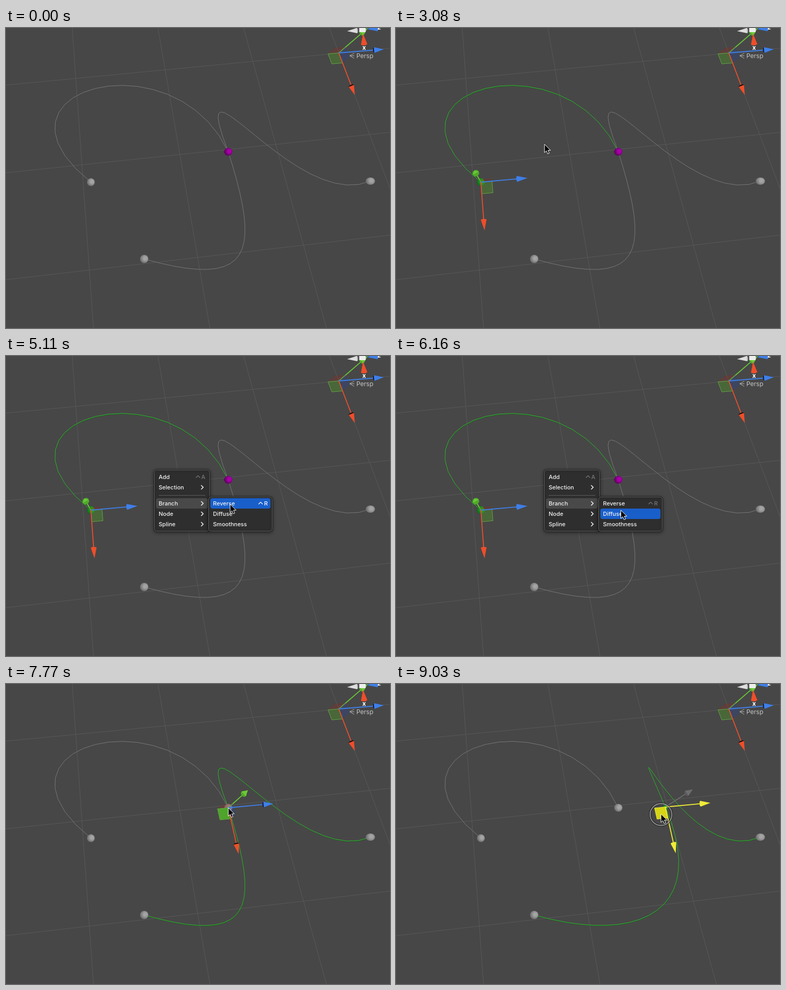
These frames come from a looping animation (742 px wide and 578 px high, 9100 ms). An HTML page with a canvas:

```html
<!DOCTYPE html>
<html lang="en">
<head>
<meta charset="utf-8">
<title>Spline editor</title>
<style>
  html, body { margin: 0; width: 100%; height: 100%; overflow: hidden; background: #474747; }
  canvas { display: block; }
</style>
</head>
<body>
<canvas id="stage" width="742" height="578"></canvas>
<script>
const ctx = document.getElementById('stage').getContext('2d');
const LOOP = 9100, STEP = 70;
const RED = '#ee4e2a', BLUE = '#3f7fe8', GREEN = '#6cc936', YELLOW = '#f0ec38', DIM = '#6d6d6d';

const vec = (x, y) => ({ x, y });
const add = (a, b, k = 1) => vec(a.x + b.x * k, a.y + b.y * k);
const mix = (a, b, k) => vec(a.x + (b.x - a.x) * k, a.y + (b.y - a.y) * k);
const progress = (t, from, to) => Math.min(1, Math.max(0, (t - from) / (to - from)));
const ease = k => k * k * (3 - 2 * k);

// Scene points
const start = vec(164, 297), joint = vec(429.5, 238.5), tail = vec(267, 445), end = vec(704, 295);
const root = vec(643, 48), menu = vec(285.5, 218.5), submenu = vec(390.5, 270.5);
const dragBy = vec(91, -1.5);
const handle = add(joint, vec(-8.5, 13.5));

// The pointer rests at each place until the next move begins
const entry = vec(264, 478);
const moves = [
  { from: 140, to: 350, place: vec(253, 231) },
  { from: 630, to: 1680, place: start },
  { from: 2800, to: 3080, place: add(menu, vec(1.5, 5.5)) },
  { from: 3430, to: 4270, place: add(menu, vec(55, 67)) },
  { from: 4550, to: 5110, place: add(submenu, vec(42.5, 15)) },
  { from: 6020, to: 6160, place: add(submenu, vec(44, 26.5)) },
  { from: 7070, to: 7420, place: joint },
  { from: 8190, to: 8470, place: handle },
  { from: 8540, to: 8960, place: add(handle, dragBy) }
];
const presses = [[2310, 2450], [3150, 3360], [6650, 6790], [7630, 7770], [8470, 9065]];
const pointerAt = t => moves.reduce((p, m) => mix(p, m.place, ease(progress(t, m.from, m.to))), entry);

function trace(points, close) {
  ctx.beginPath();
  points.forEach(p => ctx.lineTo(p.x, p.y));
  if (close) ctx.closePath();
}
function stroke(color, width = 1) {
  ctx.strokeStyle = color;
  ctx.lineWidth = width;
  ctx.stroke();
}
function fill(color) {
  ctx.fillStyle = color;
  ctx.fill();
}
function line(points, color, width) {
  trace(points);
  stroke(color, width);
}
function poly(points, color, edge) {
  trace(points, true);
  fill(color);
  if (edge) stroke(edge);
}
function ellipse(p, rx, ry, color, angle = 0) {
  ctx.beginPath();
  ctx.ellipse(p.x, p.y, rx, ry, angle, 0, 7);
  fill(color);
}
function box(x, y, w, h, r, color, edge) {
  ctx.beginPath();
  ctx.roundRect(x, y, w, h, r);
  if (color) fill(color);
  if (edge) stroke(edge);
}
function text(s, x, y, color, align = 'left', font = '500 11px Inter, sans-serif') {
  ctx.font = font;
  ctx.textAlign = align;
  ctx.fillStyle = color;
  ctx.fillText(s, x, y);
}

function curve(a, b, c, d, selected) {
  const points = Array.from({ length: 21 }, (_, i) => {
    const k = i / 20, ab = mix(a, b, k), bc = mix(b, c, k), cd = mix(c, d, k);
    return mix(mix(ab, bc, k), mix(bc, cd, k), k);
  });
  if (selected) line(points.map(p => add(p, vec(.4, .8))), '#0a6e0a');
  line(points, selected ? '#3cab3c' : '#787878');
}

const shades = { gray: ['#a4a4a4', '#626262'], purple: ['#a800a8', '#420042'], green: ['#22b022', '#0a5c0a'] };
function node(p, shade, rx = 7.5, ry = 7.5) {
  const g = ctx.createRadialGradient(p.x + 2, p.y - 1, 3, p.x + 2, p.y - 1, rx + 3);
  shades[shade].forEach((c, i) => g.addColorStop(i, c));
  ellipse(p, rx, ry, g);
}

// A cone seen from the side shows little of its base, a foreshortened one shows most of it
function cone(base, tip, width, color, capColor = color, capDepth = .4) {
  const angle = Math.atan2(tip.y - base.y, tip.x - base.x);
  const side = vec(-Math.sin(angle) * width, Math.cos(angle) * width);
  ellipse(base, width * capDepth, width, capColor, angle);
  poly([add(base, side), add(base, side, -1), tip], color);
}
function arrow(origin, axis, color, capColor) {
  const depth = Math.min(1, Math.hypot(axis.x, axis.y) / 88);
  const tip = add(origin, axis), base = add(tip, axis, -19 / 88 / Math.max(depth, .01) * depth);
  line([origin, base], color, 1.8);
  cone(base, tip, 7 - 1.6 * depth, color, capColor, Math.max(.4, Math.sqrt(1 - depth * depth)));
}
function plane(origin, a, b, color, edge) {
  poly([origin, add(origin, a), add(add(origin, a), b), add(origin, b)], color, edge);
}

// side: which way the square handle lies along the blue axis
function gizmo(origin, { red, blue, green, side, active, moving }) {
  const part = axis => vec(axis.x * .24, axis.y * .24);
  const across = vec(blue.x * .24 * side, blue.y * .24 * side);
  arrow(origin, green, moving ? DIM : GREEN, moving ? '#5c5c5c' : '#4fab2a');
  if (!moving) {
    plane(origin, across, part(green), 'rgba(150,40,30,.3)');
    plane(origin, part(red), part(green), 'rgba(40,70,150,.35)');
  }
  plane(origin, across, part(red),
    moving ? '#d6d516' : active ? '#4fa42c' : 'rgba(75,130,45,.55)', moving ? YELLOW : '#65a046');
  const shaded = side < 0 && !moving;
  arrow(origin, blue, moving ? YELLOW : BLUE, shaded ? '#0c1c40' : undefined);
  arrow(origin, red, moving ? YELLOW : RED, shaded ? '#120b0a' : undefined);
}

function drawGrid() {
  ctx.fillStyle = '#474747';
  ctx.fillRect(0, 0, 742, 578);
  for (let i = 0; i < 4; i++) {
    line([vec(0, 110 + 150.5 * i + 18.5 * i * i), vec(742, 39 + 144 * i + 18 * i * i)], '#585858');
    line([vec(128 + 165.6 * i, 0), vec(169 + 225 * i, 578)], '#585858');
  }
}

function drawViewCompass() {
  cone(vec(678, 5), vec(659, 6), 5, '#dedede', '#bdbdbd');
  cone(vec(717, 1), vec(697, 2), 5, BLUE);
  cone(vec(692, 31), vec(690, 11), 6, RED);
  box(682.5, -4, 12.5, 12, 1, '#ededed');
  const bold = 'bold 12px Inter, sans-serif';
  text('x', 692, 42, '#fff', 'center', bold);
  text('z', 721, 3, '#fff', 'center', bold);
  for (const dy of [-5, 0, 5]) line([vec(664, 53.5), vec(673, 53.5 + dy)], '#b0b0b0');
  text('Persp', 677, 58, '#c6c6c6', 'left', '12px Inter, sans-serif');
}

function panel(p, w, h) {
  ctx.save();
  ctx.shadowColor = 'rgba(0,0,0,.4)';
  ctx.shadowBlur = 6;
  ctx.shadowOffsetY = 2;
  box(p.x, p.y, w, h, 6, '#2e2e2e', '#1b1b1b');
  ctx.restore();
  box(p.x + 1, p.y + 1, w - 2, h - 2, 5, null, '#626262');
}
function menuRow(label, x, y, w, { key, hover, open }) {
  if (hover || open) box(x - 5, y - 10, w, 20, 4, hover ? '#195fca' : '#494949');
  text(label, x, y + 4, '#f2f2f2');
  const right = x + w - 10;
  if (key) {
    const color = hover ? '#fff' : '#777';
    text(key, right, y + 4, color, 'right');
    line([vec(right - 18, y + 1.5), vec(right - 14, y - 2.5), vec(right - 10, y + 1.5)], color, 1.2);
  } else if (key !== null) {
    line([vec(right - 8, y - 4), vec(right - 4, y), vec(right - 8, y + 4)], '#eee', 1.6);
  }
}
function drawMenu(t, pointer) {
  if (t < 3360 || t >= 7000) return;
  const open = t >= 4270;
  const over = (left, right, y) => pointer.x >= left && pointer.x <= right && Math.abs(pointer.y - y) < 10;
  ctx.save();
  ctx.globalAlpha = 1 - progress(t, 6790, 7000);
  panel(menu, 109, 120);
  line([vec(295, 268.5), vec(385, 268.5)], '#5c5c5c');
  ['Add', 'Selection', 'Branch', 'Node', 'Spline'].forEach((label, i) => {
    const y = 233 + 20 * i + (i > 1 ? 11 : 0);
    menuRow(label, 295, y, 100, { key: i ? undefined : 'A', hover: over(290, 390, y), open: open && label === 'Branch' });
  });
  if (open) {
    panel(submenu, 125, 68);
    ['Reverse', 'Diffuse', 'Smoothness'].forEach((label, i) => {
      const y = 284 + 20 * i;
      menuRow(label, 400, y, 116, { key: i ? null : 'R', hover: over(395, 511, y) });
    });
  }
  ctx.restore();
}

function drawPointer(t, p) {
  const press = presses.find(([from, to]) => t >= from && t < to);
  if (press) {
    ctx.globalAlpha = Math.min(1, (press[1] - t) / STEP);
    ctx.beginPath();
    ctx.arc(p.x, p.y + 1, 21, 0, 7);
    stroke('#111', 4.5);
    stroke('#fff', 1.8);
    ctx.globalAlpha = 1;
  }
  const outline = [vec(0, 0), vec(0, 16), vec(3.7, 12.6), vec(6.2, 18.4), vec(9, 17.2), vec(6.6, 11.6), vec(11.6, 11.6)];
  poly(outline.map(o => add(p, o)), '#000', '#fff');
}

function draw(t) {
  const pointer = pointerAt(t);
  const firstSelected = t >= 2450 && t < 7770, secondSelected = t >= 7770, split = t >= 7000;
  const drag = ease(progress(t, 8540, 8960)), moving = drag > 0;
  const moved = add(joint, dragBy, drag);

  drawGrid();
  curve(start, vec(-62, 118), vec(325, 14), joint, firstSelected);
  // Handles nearer the camera travel further on screen
  curve(tail, vec(477, 504), add(vec(492, 434), dragBy, drag * 1.23), moved, secondSelected);
  curve(moved, add(vec(343, 15), dragBy, drag * .89), vec(560, 357), end, secondSelected);

  gizmo(root, { red: vec(31, 81), blue: vec(87, -7), green: vec(56, -48), side: -1 });
  drawViewCompass();

  node(start, firstSelected ? 'green' : 'gray');
  node(tail, 'gray', 8, 8);
  node(end, 'gray', 9, 7);
  node(joint, split ? 'gray' : 'purple', 8, 7.5);
  if (moving) node(moved, 'green', 5, 5);
  if (firstSelected) gizmo(start, { red: vec(7, 93), blue: vec(90, -8), green: vec(-12.5, -22), side: 1 });
  if (secondSelected) {
    const green = mix(vec(38, -34), vec(53, -34), drag);
    gizmo(moved, { red: vec(20, 89), blue: vec(87, -8), green, side: -1, active: true, moving });
  }
  drawMenu(t, pointer);
  if (t >= moves[0].from) drawPointer(t, pointer);
}

function tick() {
  const t = performance.now() % LOOP;
  draw(Math.floor(t / STEP) * STEP);
  requestAnimationFrame(tick);
}
tick();
</script>
</body>
</html>
```
